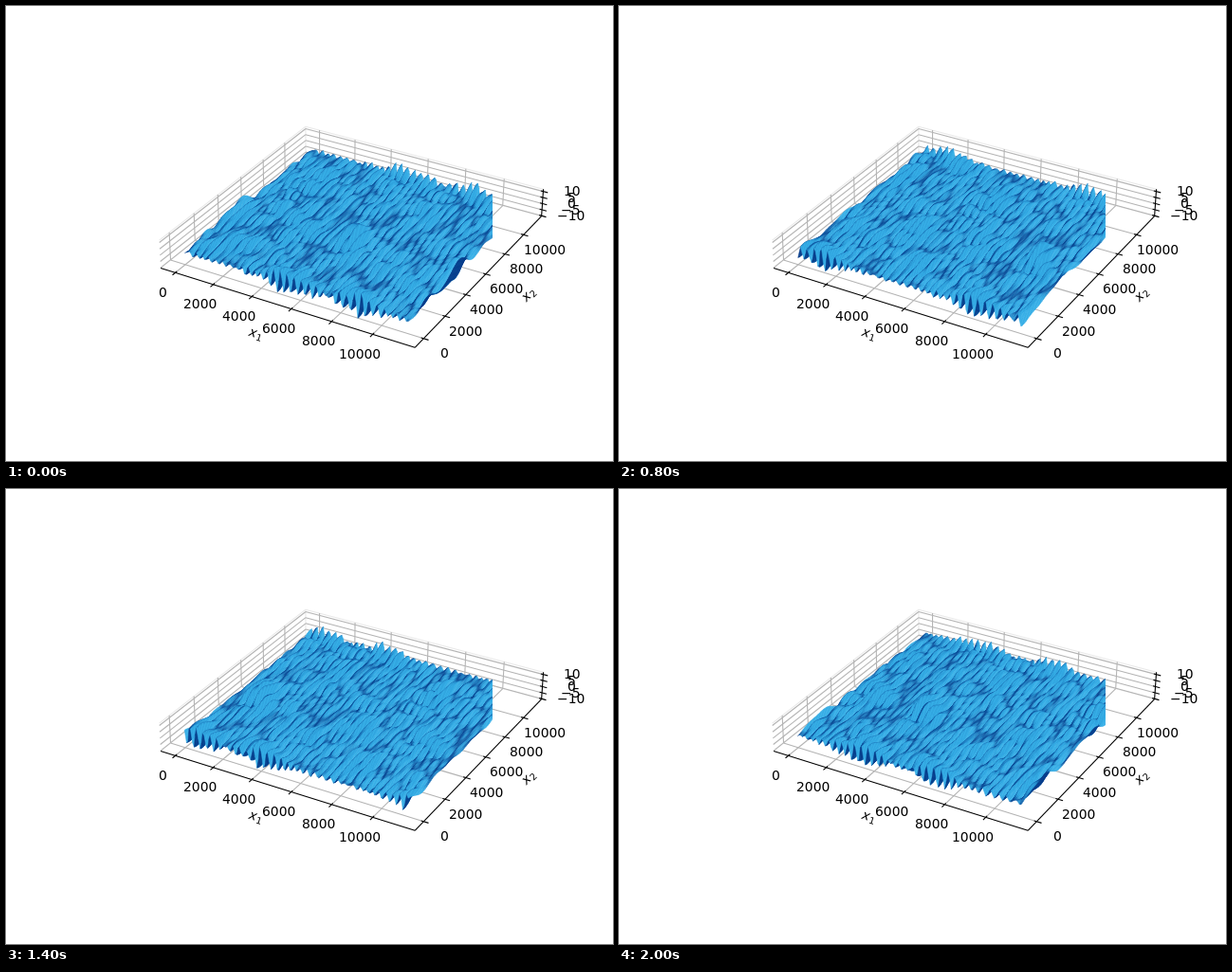
An HTML page with a canvas that plays this animation: 640 px wide and 480 px high, repeating every 2.2 s.

```html
<!DOCTYPE html>
<html lang="en">
<head>
<meta charset="utf-8">
<title>Wave surface</title>
<style>
html, body { margin: 0; width: 100%; height: 100%; overflow: hidden; background: #fff; }
canvas { display: block; }
</style>
</head>
<body>
<canvas id="stage" width="640" height="480"></canvas>
<script>
const W = 640, H = 480, STEP = 200, STEPS = 11;
const NX = 140, NY = 100;            // surface cells
const LO = -0.6144, HI = 0.8776;     // box limits, world units
const BOTTOM = -0.12, TOP = 0.048;
const SIZE = 11250;                  // side of the sea patch
const CLIP = 513;
const GROUP = 0.083;                 // group speed, patch widths per step
const M0 = 31;                       // main wave count across the patch
const TAU = Math.PI * 2;
const FONT = '"DejaVu Sans", sans-serif';

const ground = v => -0.522 + v * 1.166e-4;
const height = z => -0.042 + z * 0.0076;

// Perspective view: elevation 30, azimuth -60
function project(x, y, z) {
  const k = 1997.8 / (10 - 0.433 * x + 0.75 * y - 0.5 * z);
  return [333 + k * (0.866 * x + 0.5 * y), 232.6 - k * (-0.25 * x + 0.433 * y + 0.866 * z)];
}

let seed = 77;
function random() {
  seed = (seed * 1664525 + 1013904223) % 4294967296;
  return seed / 4294967296;
}
const gauss = () => Math.sqrt(-2 * Math.log(1 - random())) * Math.cos(TAU * random());

const modes = Array.from({ length: 64 }, () => ({
  m: Math.max(18, Math.round(M0 + gauss() * 4.5)),
  n: Math.round(gauss() * 2.6),
  a: 0.2 + 0.3 * random(),
  p: TAU * random()
}));

// Wave groups: x, y, amplitude, length, width
const groups = [
  [0.47, 0, 4.8, 0.08, 0.11],
  [0.51, 0.42, 4, 0.1, 0.13],
  [0.27, 0.49, 4, 0.09, 0.12],
  [0.14, 0.79, 4.4, 0.1, 0.15],
  [0.74, 0.03, 4.4, 0.16, 0.11],
  [0.88, 0.25, 3.2, 0.1, 0.12]
];

const wrap = d => d - Math.round(d);

function makeHeights(step) {
  const z = new Float32Array((NX + 1) * (NY + 1));
  const waves = modes.map(w => ({
    ...w, p: w.p - TAU * 2 * GROUP * Math.sqrt(M0 * Math.hypot(w.m, w.n)) * step
  }));
  for (let j = 0, q = 0; j <= NY; j++) {
    for (let i = 0; i <= NX; i++, q++) {
      const x = i / NX, y = j / NY;
      let h = 0;
      for (const w of waves) h += w.a * Math.cos(TAU * (w.m * x + w.n * y) + w.p);
      for (const [gx, gy, amp, len, wide] of groups) {
        const dx = wrap(x - gx - GROUP * step), dy = wrap(y - gy);
        const e = (dx / len) ** 2 + (dy / wide) ** 2;
        if (e < 7) {
          h += amp * Math.exp(-e) *
            Math.cos(TAU * (M0 * (dx - GROUP * step) + 14 * dy * dy - 1.5 * dy));
        }
      }
      z[q] = h;
    }
  }
  return z;
}

const LIGHT = [54, 174, 230], MID = [30, 125, 192], DARK = [6, 60, 138];
const LEVELS = 32;
const palette = Array.from({ length: LEVELS + 1 }, (_, i) => {
  const t = i / LEVELS * 2 - 1;
  const end = t < 0 ? LIGHT : DARK;
  const mix = MID.map((c, n) => Math.round(c + (end[n] - c) * Math.abs(t)));
  return `rgb(${mix})`;
});

function shade(rise) {
  const t = Math.tanh((rise + 0.5) * 0.8);
  return palette[Math.round((t + 1) / 2 * LEVELS)];
}

function line(c, a, b, color, width = 1.1) {
  const [x1, y1] = project(...a), [x2, y2] = project(...b);
  c.strokeStyle = color;
  c.lineWidth = width;
  c.beginPath();
  c.moveTo(x1, y1);
  c.lineTo(x2, y2);
  c.stroke();
}

function axisName(c, x, y, angle, index) {
  c.save();
  c.translate(x, y);
  c.rotate(angle);
  c.font = 'italic 13.9px ' + FONT;
  c.fillText('x', -7, 0);
  c.font = '9.7px ' + FONT;
  c.fillText(index, 1.5, 3.5);
  c.restore();
}

function drawAxes(c) {
  const grid = '#b4b4b4', edge = '#e9e9e9';
  c.textBaseline = 'middle';

  for (const z of [BOTTOM, TOP]) {
    line(c, [LO, LO, z], [LO, HI, z], edge);
    line(c, [LO, HI, z], [HI, HI, z], edge);
  }
  line(c, [LO, HI, BOTTOM], [LO, HI, TOP], edge);

  const ticks = [0, 2000, 4000, 6000, 8000, 10000];
  for (const v of ticks) {
    const g = ground(v);
    line(c, [g, LO, BOTTOM], [g, HI, BOTTOM], grid);
    line(c, [g, HI, BOTTOM], [g, HI, TOP], grid);
    line(c, [LO, g, BOTTOM], [HI, g, BOTTOM], grid);
    line(c, [LO, g, BOTTOM], [LO, g, TOP], grid);
  }
  const levels = [-10, -5, 0, 5, 10];
  for (const v of levels) {
    const z = height(v);
    line(c, [LO, LO, z], [LO, HI, z], grid);
    line(c, [LO, HI, z], [HI, HI, z], grid);
  }

  line(c, [LO, LO, BOTTOM], [HI, LO, BOTTOM], '#000');
  line(c, [HI, LO, BOTTOM], [HI, HI, BOTTOM], '#000');
  line(c, [HI, HI, BOTTOM], [HI, HI, TOP], '#000');

  c.fillStyle = '#000';
  c.font = '13.9px ' + FONT;
  const label = (text, at, dx, dy) => {
    const [x, y] = project(...at);
    c.fillText(text, Math.round(x + dx - c.measureText(text).width / 2), Math.round(y + dy));
  };
  for (const v of ticks) {
    const g = ground(v);
    line(c, [g, LO - 0.027, BOTTOM], [g, LO + 0.014, BOTTOM], '#000');
    line(c, [HI - 0.014, g, BOTTOM], [HI + 0.027, g, BOTTOM], '#000');
    label(v, [g, LO, BOTTOM], -13.4, 21.6);
    label(v, [HI, g, BOTTOM], 22.2, 16.6);
  }
  for (const v of levels) {
    const z = height(v);
    line(c, [HI - 0.014, HI, z], [HI + 0.027, HI, z], '#000');
    label(String(v).replace('-', '\u2212'), [HI, HI, z], 30.5, 0.7);
  }
  axisName(c, 263, 346, 0.3, '1');
  axisName(c, 551, 305, -0.8, '2');
}

function drawSurface(c, step) {
  const z = makeHeights(step);
  const row = NX + 1;
  const points = Array.from(z, (h, q) => project(
    ground(q % row / NX * SIZE), ground(Math.floor(q / row) / NY * SIZE), height(h)));
  c.save();
  c.beginPath();
  c.rect(0, 0, CLIP, H);
  c.clip();
  c.lineWidth = 0.5;
  // Far cells first
  for (let j = NY - 1; j >= 0; j--) {
    for (let i = 0; i < NX; i++) {
      const q = j * row + i;
      const corners = [q, q + 1, q + row + 1, q + row];
      if (corners.every(n => points[n][0] > CLIP + 1)) continue;
      c.fillStyle = c.strokeStyle = shade((z[q + 1] - z[q] + z[q + row + 1] - z[q + row]) / 2);
      c.beginPath();
      for (const n of corners) c.lineTo(points[n][0], points[n][1]);
      c.closePath();
      c.fill();
      c.stroke();
    }
  }
  c.restore();
}

const cache = [];
function picture(step) {
  if (!cache[step]) {
    const canvas = document.createElement('canvas');
    canvas.width = W;
    canvas.height = H;
    const c = canvas.getContext('2d');
    c.fillStyle = '#fff';
    c.fillRect(0, 0, W, H);
    drawAxes(c);
    drawSurface(c, step);
    cache[step] = canvas;
  }
  return cache[step];
}

const stage = document.getElementById('stage').getContext('2d');
const start = performance.now();
let shown = -1;
function tick() {
  const step = Math.floor((performance.now() - start) / STEP) % STEPS;
  if (step !== shown) {
    stage.drawImage(picture(step), 0, 0);
    shown = step;
    setTimeout(picture, 0, (step + 1) % STEPS);
  }
  requestAnimationFrame(tick);
}
tick();
</script>
</body>
</html>
```
